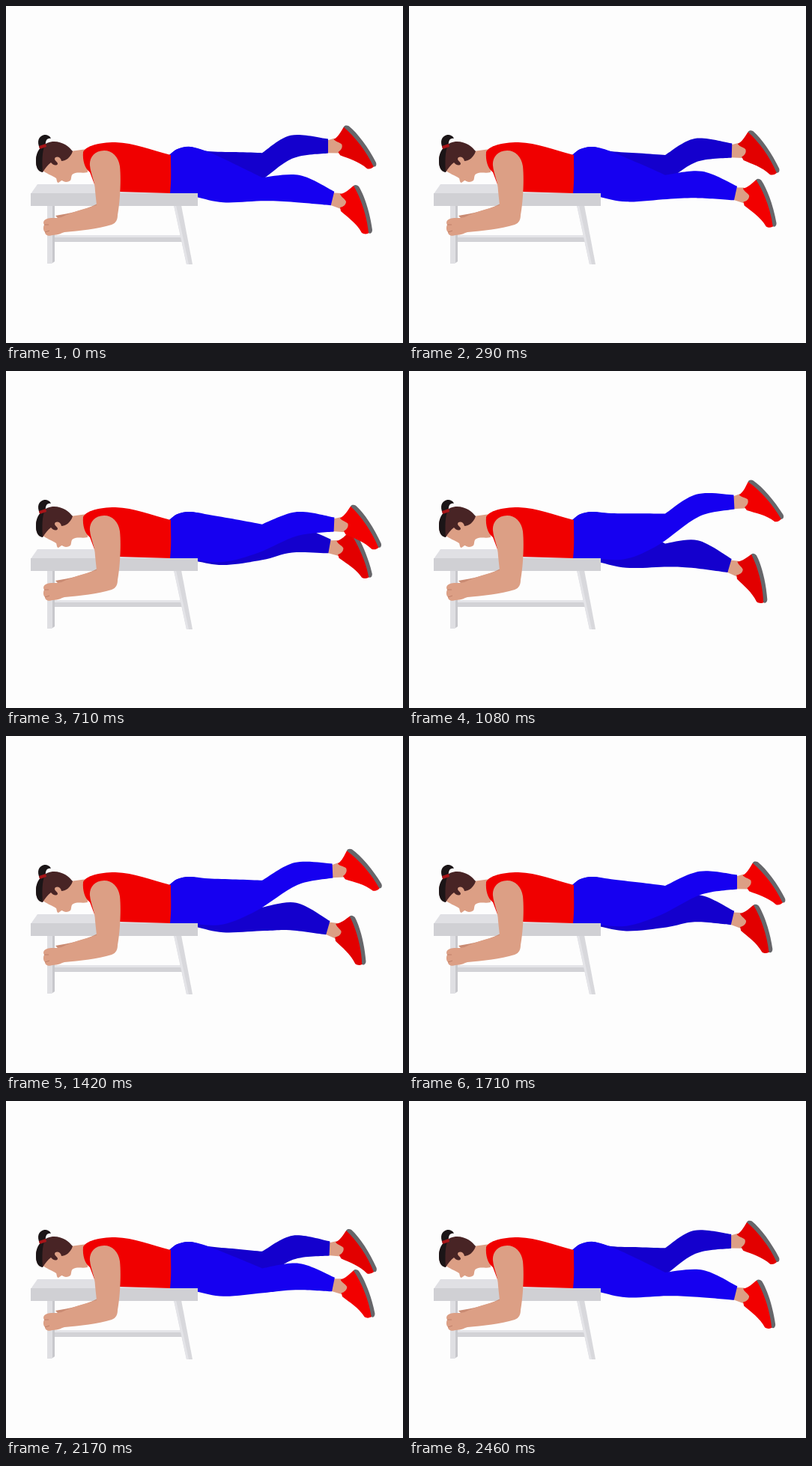
An HTML page that plays this animation: 530 by 450 pixels, repeating every 2.5 s.

```html
<!DOCTYPE html>
<html lang="en">
<head>
<meta charset="utf-8">
<title>Prone leg kicks</title>
<style>
html, body { margin: 0; width: 100%; height: 100%; overflow: hidden; background: #fdfdfd; }
svg { display: block; width: 530px; height: 450px; }
</style>
</head>
<body>
<svg viewBox="0 0 530 450" xmlns="http://www.w3.org/2000/svg">
  <defs>
    <path id="ankle" d="M-6 -8 L11 -7 C18 -4 21 3 19 8 L11 14 L-5 8Z"/>
    <path id="shoe" d="M10 -6 C17 -7 23 -13 28 -17 L31 -16 C40 -1 47 21 50 45 C47 48 42 48 39 46 C32 33 20 25 11 17 L10 12 C15 11 18 8 18 4 C16 0 12 -1 10 -6Z"/>
    <path id="sole" d="M28 -17 C30 -19 33 -18 35 -16 C43 -3 50 20 53 42 C53 46 50 48 48 46 C46 24 38 0 28 -17Z"/>
  </defs>

  <!-- bench frame -->
  <path d="M42 238H246L256 251H33Z" fill="#e0e0e4"/>
  <path d="M63 306H236L238 315H63Z" fill="#d2d2d6"/>
  <path d="M63 306H236L237 309H63Z" fill="#e4e4e8"/>
  <path d="M55 266H65V341L61 344H55Z" fill="#dfdfe3"/>
  <path d="M62 266H65V341L62 343Z" fill="#c8c8cc"/>
  <path d="M224 266H234L249 345H241Z" fill="#d8d8dc"/>
  <path d="M224 266H227L244 345H241Z" fill="#e4e4e8"/>

  <g id="far"></g>
  <g id="near"></g>

  <!-- bench edge -->
  <path d="M33 250H256V267H33Z" fill="#d0d0d4"/>

  <!-- head and neck -->
  <path d="M48 219 C54 224 61 226 67 230 C68 233 68 236 70 236 C72 235 73 233 75 233 C77 235 82 236 86 233 C88 230 86 226 90 224 C96 221 102 224 109 222 L108 191 L86 194 L62 194 L52 210Z" fill="#dc9f85"/>
  <path d="M40 207 C40 192 50 183 62 181 C74 180 84 187 89 194 C86 203 79 207 74 207 C73 201 66 200 65 204 C65 207 69 208 69 211 C67 214 62 212 60 209 C56 212 52 217 49 222 C42 221 40 214 40 207Z" fill="#482425"/>
  <path d="M40 207 C40 196 45 188 52 185 C48 195 48 208 49 222 C42 221 40 214 40 207Z" fill="#1b1517"/>
  <path d="M45 190 C41 181 43 174 51 172 C56 172 59 174 60 177 C55 176 52 179 53 188Z" fill="#1b1517"/>
  <path d="M44 187L53 184L54 188L45 191Z" fill="#a81418"/>

  <!-- torso -->
  <path d="M103 195 C107 187 123 182 146 182 C172 183 192 192 220 199 C220 217 221 233 219 250 L152 248 L118 238 L112 222 C105 217 102 206 103 195Z" fill="#f00000"/>

  <!-- arm and hand -->
  <path d="M66 280 C85 277 104 273 122 264 L130 276 L78 292Z" fill="#c98a72"/>
  <path d="M131 193 C118 193 111 203 112 213 C113 224 119 235 119 247 L121 266 C104 271 88 275 74 282 C65 284 59 282 55 284 C50 286 49 289 51 292 C49 296 50 300 52 302 C52 306 57 308 62 306 C70 306 74 303 78 302 C99 300 122 298 141 292 C147 290 149 285 149 279 C152 263 154 233 152 214 C150 201 142 193 131 193Z" fill="#dc9f85"/>
  <path d="M51 292 H57 M52 302 L58 300" stroke="#c0806a" fill="none"/>
</svg>
<script>
const LOOP = 2500, FRAMES = 60, RAD = Math.PI / 180;
const KEYS = [0, 7, 17, 26, 41, 52];

const legs = [
  { id: 'far', pants: '#1400cd', red: '#e20000', seat: () => 194,
    x: [430, 431, 432, 428, 432, 432],
    y: [187, 193, 234, 260, 243, 197],
    foot: [34, 32, 20, 11, 15, 30.6] },
  { id: 'near', pants: '#1600f0', red: '#f20000', seat: d => 190 + d * .06,
    x: [436, 436, 438, 434, 438, 437],
    y: [257, 250, 205, 175, 195, 245],
    foot: [14.5, 16.7, 31, 38.5, 34, 18] }
];

// Periodic cubic through the values at KEYS
function track(v, f) {
  const n = KEYS.length;
  const at = i => KEYS[(i + n) % n] + FRAMES * Math.floor(i / n);
  const val = i => v[(i + n) % n];
  const slope = i => (val(i + 1) - val(i - 1)) / (at(i + 1) - at(i - 1));
  let i = n - 1;
  while (KEYS[i] > f) i--;
  const h = at(i + 1) - at(i), u = (f - at(i)) / h, w = 1 - u;
  return val(i) * w * w * (1 + 2 * u) + val(i + 1) * u * u * (3 - 2 * u)
    + h * u * w * (slope(i) * w - slope(i + 1) * u);
}

// Smooth curve segments through points
function curve(p) {
  let d = '';
  for (let i = 0; i < p.length - 1; i++) {
    const a = p[Math.max(i - 1, 0)], b = p[i], c = p[i + 1], e = p[Math.min(i + 2, p.length - 1)];
    const q = [b[0] + (c[0] - a[0]) / 6, b[1] + (c[1] - a[1]) / 6,
               c[0] - (e[0] - b[0]) / 6, c[1] - (e[1] - b[1]) / 6, c[0], c[1]];
    d += 'C' + q.map(n => n.toFixed(2)).join(' ');
  }
  return d;
}

for (const leg of legs) {
  const g = document.getElementById(leg.id);
  g.innerHTML = `<g><use href="#ankle" fill="#dc9f85"/><use href="#shoe" fill="${leg.red}"/>` +
    `<use href="#sole" fill="#66666a"/></g><path fill="${leg.pants}"/>`;
  leg.footEl = g.firstChild;
  leg.pantsEl = g.lastChild;
}

function pose(leg, f) {
  const x = track(leg.x, f), y = track(leg.y, f), a = track(leg.foot, f);
  const deg = 24 - .7 * a, c = Math.cos(deg * RAD), s = Math.sin(deg * RAD);
  const shin = (u, v) => [x + u * c - v * s, y + u * s + v * c];
  const d = y - 176, seat = leg.seat(d);
  const pit = [342, 191 + d * .47];
  const thigh = [[218, 199], [229, 191], [246, 188], [270, seat],
    [307, (seat + pit[1]) / 2], pit];
  const calf = [pit, shin(-50, -14 - deg * .4), shin(0, -9.5)];
  const hem = shin(0, 9.5);
  const under = [hem, shin(-48, 17), [334 + d * .14, 232 + d * .35],
    [290, 251 + d * .14], [250, 251 + d * .04], [218, 250]];
  leg.pantsEl.setAttribute('d',
    'M218 199' + curve(thigh) + curve(calf) + 'L' + hem + curve(under) + 'Z');
  leg.footEl.setAttribute('transform', `translate(${x} ${y}) rotate(${14.5 - a})`);
}

const start = performance.now();
function draw(now) {
  const t = Math.max(0, now - start) % LOOP;
  const f = Math.floor(t * FRAMES / LOOP + .15) % FRAMES;
  legs.forEach(leg => pose(leg, f));
  requestAnimationFrame(draw);
}
draw(start);
</script>
</body>
</html>
```
